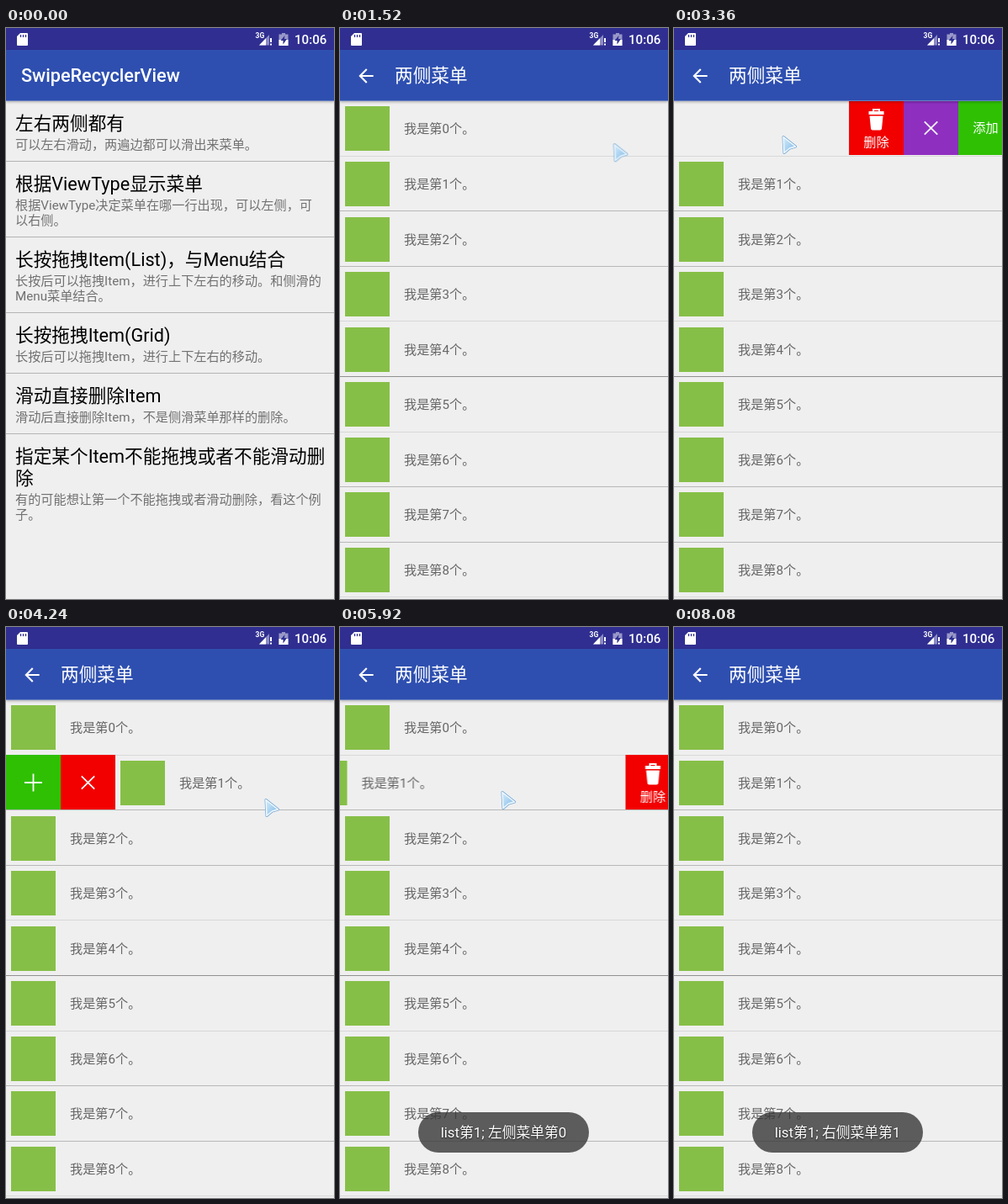
Write an HTML page that moves like this. It is 390x679 px and loops after 8240 ms.

```html
<!DOCTYPE html>
<html lang="zh-CN">
<head>
<meta charset="utf-8">
<title>SwipeRecyclerView</title>
<style>
html, body { margin: 0; width: 100%; height: 100%; overflow: hidden; }
body { background: #efefef; font-family: Roboto, "Noto Sans CJK SC", "Noto Sans CJK", sans-serif; text-spacing-trim: space-all; }
#stage { position: relative; width: 390px; height: 679px; overflow: hidden; }
#stage div, #stage svg { position: absolute; white-space: nowrap; }
.screen { left: 0; top: 0; width: 390px; height: 679px; background: #efefef; overflow: hidden; isolation: isolate; }
.screen::before { content: ""; position: absolute; left: 0; top: 0; width: 390px; height: 26px; background: #302f91; }
.bar { left: 0; top: 26px; width: 390px; height: 60px; background: #2e4fb0; border-bottom: 1px solid #6b82c2; color: #fff; font-size: 21.67px; line-height: 62px; box-shadow: 0 1px 3px rgba(0,0,0,.3); z-index: 2; }
.line { left: 0; width: 390px; height: 1px; }
.head { left: 11px; color: #000; font-size: 21.67px; line-height: 26px; }
.sub { left: 11px; color: #717171; font-size: 15.17px; line-height: 18px; }
.row { left: 0; width: 390px; height: 65px; overflow: hidden; }
.slide { left: 0; top: 0; width: 390px; height: 65px; }
.icon { left: 6px; top: 7px; width: 53px; height: 53px; background: #86bf47; }
.label { left: 76px; top: 1px; color: #666; font-size: 15.17px; line-height: 66px; }
.btn { top: 0; width: 65px; height: 65px; color: #fff; font-size: 15.17px; text-align: center; }
.btn span { position: absolute; left: 0; width: 65px; line-height: 20px; }
.btn svg { left: 0; top: 0; }
.toast { left: 93px; top: 577px; width: 203px; height: 48px; border-radius: 24px; background: rgba(56,56,56,.8); color: #fff; font-size: 16.8px; line-height: 49px; text-align: center; text-shadow: 0 1px 2px rgba(0,0,0,.7); opacity: 0; }
#cursor { left: 0; top: 0; overflow: visible; }
</style>
</head>
<body>
<div id="stage">
  <div class="screen" id="home">
    <div class="bar"><div style="left:18px;font-weight:500">SwipeRecyclerView</div></div>
  </div>
  <div class="screen" id="page">
    <div class="bar">
      <svg style="left:17.5px;top:18px" width="26" height="26" viewBox="0 0 24 24" fill="none" stroke="#fff" stroke-width="2"><path d="M20 12H5M12.7 4.7 5.4 12l7.3 7.3"/></svg>
      <div style="left:65px">两侧菜单</div>
    </div>
  </div>
  <div class="toast" id="toastLeft">list第1; 左侧菜单第0</div>
  <div class="toast" id="toastRight">list第1; 右侧菜单第1</div>
  <svg width="390" height="26" style="left:0;top:0" fill="#fff">
    <path d="M17 6h8q1 0 1 1v13q0 1-1 1H14q-1 0-1-1V10z"/>
    <path d="M17.5 8v3M20.5 8v3M23.5 8v3" stroke="#302f91" stroke-width="1.3"/>
    <text x="296.5" y="12" font-size="8.5" font-weight="700">3G</text>
    <path d="M301 20.5 313 8v12.5z" opacity=".45"/>
    <path d="M301 20.5 309 12.2v8.3z"/>
    <path d="M314 12h2v5h-2zM314 18.5h2v2h-2z"/>
    <path d="M328 6h4v1.5h3.5V21h-11V7.5h3.5z" opacity=".5"/>
    <path d="M324.5 14h11v7h-11z"/>
    <path d="M331.5 9 326.5 15h3v4.5l4.5-6.5h-3z" fill="#302f91"/>
    <text x="343" y="19" font-size="15.17" font-weight="500">10:06</text>
  </svg>
  <svg id="cursor" width="18" height="23" stroke-linejoin="round">
    <defs>
      <linearGradient id="ice" x2="1" y2="1"><stop stop-color="#d5ecfb"/><stop offset="1" stop-color="#7fb9e6"/></linearGradient>
      <path id="arrow" d="M2 1.5 16.5 13 9.5 15 3 20.5z"/>
    </defs>
    <use href="#arrow" fill="none" stroke="#79abd6" stroke-width="3"/>
    <use href="#arrow" fill="url(#ice)" stroke="#f2f9ff" stroke-width="1.5"/>
  </svg>
</div>
<script>
const LOOP = 8240, STEP = 80, BTN = 65, PITCH = 65.55;
const $ = id => document.getElementById(id);

function add(parent, cls, html = '', style = {}) {
  const el = document.createElement('div');
  el.className = cls;
  el.innerHTML = html;
  Object.assign(el.style, style);
  parent.append(el);
  return el;
}

// Home list
const items = [
  ['左右两侧都有', '可以左右滑动，两遍边都可以滑出来菜单。'],
  ['根据ViewType显示菜单', '根据ViewType决定菜单在哪一行出现，可以左侧，可<br>以右侧。'],
  ['长按拖拽Item(List)，与Menu结合', '长按后可以拖拽Item，进行上下左右的移动。和侧滑的<br>Menu菜单结合。'],
  ['长按拖拽Item(Grid)', '长按后可以拖拽Item，进行上下左右的移动。'],
  ['滑动直接删除Item', '滑动后直接删除Item，不是侧滑菜单那样的删除。'],
  ['指定某个Item不能拖拽或者不能滑动删<br>除', '有的可能想让第一个不能拖拽或者滑动删除，看这个例<br>子。']
];
const lines = s => s.split('<br>').length;
let y = 86;
items.forEach(([head, sub], i) => {
  const headH = 26 * lines(head);
  if (i) add($('home'), 'line', '', { top: y + 'px', background: '#b4b4b4' });
  add($('home'), 'head', head, { top: y + 14.5 + 'px' });
  add($('home'), 'sub', sub, { top: y + 17.5 + headH + 'px' });
  y += headH + 18 * lines(sub) + 28;
});

// Swipe rows with their side menus
const GREEN = '#2fc003', RED = '#f20000', PURPLE = '#8e2fc0';
const svg = (d, attrs) => `<svg width="65" height="65" ${attrs}><path d="${d}"/></svg>`;
const stroke = 'fill="none" stroke="#fff" stroke-width="1.8"';
const plus = svg('M32.5 22.5v21M22 33h21', stroke);
const cross = svg('M24.8 25.3l15.4 15.4M40.2 25.3 24.8 40.7', stroke);
const trash = svg('M28 10h9v3h4.500v4h-18v-4H28zM30 12v1h5v-1zM24.500 18.500h16l-1.500 15q-.2 2-2 2h-9q-1.800 0-2-2z', 'fill="#fff" fill-rule="evenodd"');
const leftMenu = [[GREEN, plus], [RED, cross]];
const rightMenu = [
  [RED, trash + '<span style="top:40px">删除</span>'],
  [PURPLE, cross],
  [GREEN, '<span style="top:23px">添加</span>']
];
function addMenu(slide, menu, x) {
  menu.forEach(([background, html], i) => add(slide, 'btn', html, { left: x + i * BTN + 'px', background }));
}
const shades = ['#d8d8d8', '#b8b8b8', '#b8b8b8', '#d8d8d8', '#909090'];
const slides = Array.from({ length: 9 }, (_, i) => {
  const row = add($('page'), 'row', '', { top: 86 + Math.ceil(i * PITCH) + 'px' });
  const slide = add(row, 'slide');
  add(slide, 'icon');
  add(slide, 'label', `我是第${i}个。`);
  if (i < 2) {
    addMenu(slide, leftMenu, -2 * BTN);
    addMenu(slide, rightMenu, 390);
  }
  const line = add($('page'), 'line', '', { top: Math.floor(86.72 + (i + 1) * PITCH) + 'px', background: shades[i % 5] });
  $('page').prepend(line);
  return slide;
});

// Motion: every pose is a function of time, shown in steps of STEP ms
const part = (t, start, end) => Math.min(1, Math.max(0, (t - start) / (end - start)));
const ramp = (t, start, end) => { const u = part(t, start, end); return u * u * (3 - 2 * u); };
const pulse = (t, a, b, c, d) => ramp(t, a, b) - ramp(t, c, d);
const shift = (x, y = 0) => ({ transform: `translate(${x}px, ${y}px)` });

function play(el, pose) {
  const frames = [];
  for (let t = 0; t <= LOOP; t += STEP) frames.push({ ...pose(t), offset: t / LOOP, easing: 'step-end' });
  el.animate(frames, { duration: LOOP, iterations: Infinity, delay: -1, fill: 'both' });
}

// Cursor stops: ms, x, y
const stops = [
  [560, 168, 112], [880, 67, 138], [1440, 333, 139], [1840, 290, 130], [2400, 289, 127], [2880, 79, 135],
  [3200, 128, 128], [3440, 128, 128], [4240, 307, 204], [4880, 36, 186], [5200, 36, 186], [5760, 329, 196],
  [5920, 191, 195], [6720, 100, 198], [7200, 313, 192]
];
function cursorAt(t) {
  const i = stops.findIndex(s => s[0] > t);
  if (i < 1) return (i ? stops[stops.length - 1] : stops[0]).slice(1);
  const [t0, x0, y0] = stops[i - 1], [t1, x1, y1] = stops[i], u = part(t, t0, t1);
  return [x0 + (x1 - x0) * u, y0 + (y1 - y0) * u];
}

play($('page'), t => {
  const left = 1 - part(t, 620, 1200);
  return { opacity: 1 - left ** 8, ...shift(0, Math.round(54 * left ** 5)) };
});
play(slides[0], t => shift(-3 * BTN * pulse(t, 2400, 2880, 3300, 3680)));
play(slides[1], t => shift(2 * BTN * pulse(t, 3760, 4240, 4960, 5360) - 3 * BTN * pulse(t, 5840, 6080, 7600, 7920)));
play($('toastLeft'), t => ({ opacity: pulse(t, 5360, 5680, 6880, 7460) }));
play($('toastRight'), t => ({ opacity: ramp(t, 7760, 8080) }));
play($('cursor'), t => ({ opacity: t >= 80 && t < 8000 ? 1 : 0, ...shift(...cursorAt(t)) }));
</script>
</body>
</html>
```
